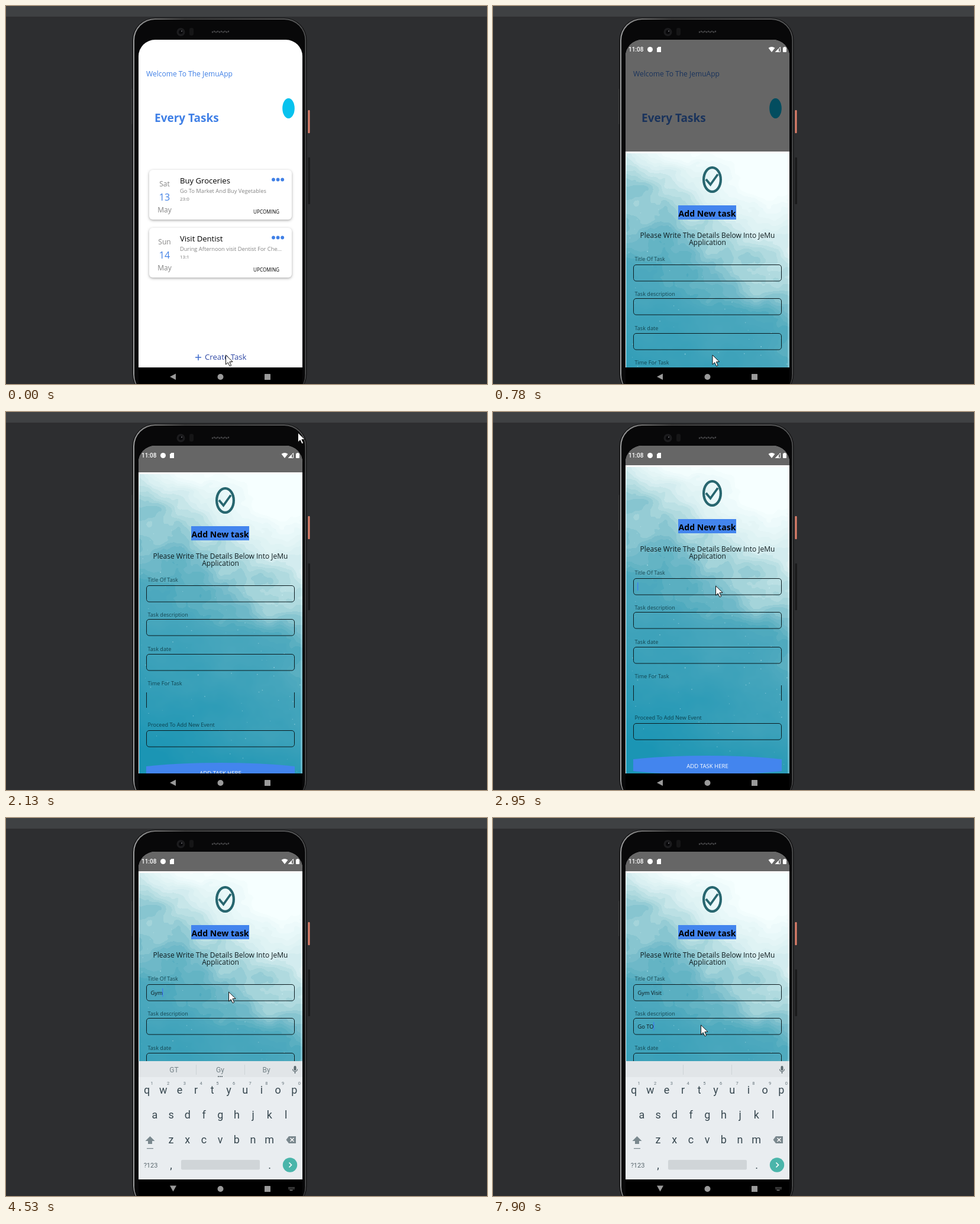
Recreate the animation shown at these times as an HTML page with a canvas. Size 813 by 639 pixels, loop 8 s.

```html
<!DOCTYPE html>
<html lang="en">
<head>
<meta charset="utf-8">
<title>Task form</title>
<style>
html, body { margin: 0; width: 100%; height: 100%; overflow: hidden; background: #2d2e30; }
canvas { display: block; }
</style>
</head>
<body>
<canvas id="stage" width="813" height="639"></canvas>
<script>
const ctx = document.getElementById('stage').getContext('2d');
const LOOP = 8000;
const SANS = '"Open Sans", sans-serif', KEYS = 'Roboto, sans-serif';
const BLUE = '#4080e6', TEAL = '#27666f';
const LEFT = 224, RIGHT = 501, TOP = 57, BOTTOM = 611;

const REFRESH = [0, 500, 620, 780, 920, 1200, 1320, 1460, 1590, 1740, 1870, 1990, 2130, 2280, 2400,
  2520, 2660, 2950, 3080, 3200, 3330, 3460, 3830, 4260, 4410, 4530, 4680, 4800, 4920, 5040, 5160,
  5410, 5530, 5680, 5800, 6350, 6470, 6730, 6850, 7270, 7400, 7510, 7650, 7900];

const POINTER = [[0, 371.5, 590], [780, 371, 590], [920, 355, 396], [1060, 355, 396], [1320, 355, 475],
  [1590, 387, 373], [1870, 435, 190], [2130, 493.5, 35], [2280, 465, 110], [2520, 376, 278],
  [2660, 376.5, 294], [6250, 376.5, 294], [6470, 351.5, 350]];
const SHEET = [[380, BOTTOM], [500, 450], [620, 290], [780, 246], [1590, 246], [1740, 222],
  [1870, 170], [1990, 122], [2130, 102], [2280, 92], [2400, 90]];

const TITLE = [[0, ''], [4260, 'Gy'], [4530, 'Gym'], [4920, 'Gym '], [5160, 'Gym V'], [5410, 'Gym Vi'],
  [5530, 'Gym Vis'], [5680, 'Gym Visi'], [5800, 'Gym Visit']];
const DETAIL = [[0, ''], [7270, 'G'], [7400, 'Go'], [7510, 'Go '], [7650, 'Go T'], [7900, 'Go TO']];
const HINTS = [[0, []], [4410, ['GT', 'Gy', 'By']], [4680, ['Gum', 'Gym', 'Gyms']], [4920, []],
  [5680, ['Visited', 'Visit', 'Visitors']], [6850, []], [7650, ['Good', 'Go', 'Going']], [7900, []]];
const CARET = [[0, 0], [2950, 1], [3830, 0], [4260, 1], [6350, 0], [6730, 2]];

const clamp = v => Math.max(0, Math.min(1, v));
const held = (list, t) => list.findLast(k => k[0] <= t)[1];

function along(keys, t) {
  const i = keys.findIndex(k => k[0] > t);
  if (i < 0) return keys.at(-1).slice(1);
  if (i === 0) return keys[0].slice(1);
  const a = keys[i - 1], b = keys[i], p = (t - a[0]) / (b[0] - a[0]);
  return a.slice(1).map((v, j) => v + (b[j + 1] - v) * p);
}

function rect(x, y, w, h, fill, r = 0) {
  ctx.fillStyle = fill;
  ctx.beginPath();
  ctx.roundRect(x, y, w, h, r);
  ctx.fill();
}

function oval(x, y, rx, ry, fill) {
  ctx.fillStyle = fill;
  ctx.beginPath();
  ctx.ellipse(x, y, rx, ry, 0, 0, 7);
  ctx.fill();
}

function poly(points, fill) {
  ctx.fillStyle = fill;
  ctx.beginPath();
  points.forEach(p => ctx.lineTo(...p));
  ctx.closePath();
  ctx.fill();
}

function line(points, color, width = 1) {
  ctx.strokeStyle = color;
  ctx.lineWidth = width;
  ctx.beginPath();
  points.forEach(p => ctx.lineTo(...p));
  ctx.stroke();
}

function text(s, x, y, size, color, { align = 'left', weight = 400, font = SANS } = {}) {
  ctx.font = `${weight} ${size}px ${font}`;
  ctx.textAlign = align;
  ctx.fillStyle = color;
  ctx.fillText(s, x, y);
}

const hash = (x, y) => {
  const s = Math.sin(x * 127.1 + y * 311.7) * 43758.5453;
  return s - Math.floor(s);
};

function noise(x, y) {
  const ix = Math.floor(x), iy = Math.floor(y);
  const ease = v => v * v * (3 - 2 * v);
  const fx = ease(x - ix), fy = ease(y - iy);
  const mix = (a, b, p) => a + (b - a) * p;
  return mix(mix(hash(ix, iy), hash(ix + 1, iy), fx),
    mix(hash(ix, iy + 1), hash(ix + 1, iy + 1), fx), fy);
}

// Watercolour wash: pale top right, deep teal towards the bottom.
function makeWash() {
  const w = RIGHT - LEFT, h = 540;
  const ramp = [[-150, 246, 255, 255], [-60, 214, 238, 240], [0, 164, 212, 218], [40, 122, 190, 203],
    [100, 78, 169, 190], [250, 52, 158, 184], [400, 27, 149, 180]];
  const wash = new OffscreenCanvas(w, h), c = wash.getContext('2d');
  const image = c.createImageData(w, h);
  for (let y = 0; y < h; y++) for (let x = 0; x < w; x++) {
    let n = 0;
    for (let o = 0; o < 4; o++) n += (noise(x / (70 >> o) + 9 * o, y / (56 >> o) + 5) - .5) / 2 ** o;
    let d = y - 60 - 180 * x / w + n * 75;
    if (d < 120) d = Math.round(d / 14) * 14;
    image.data.set([...along(ramp, d), 255], (y * w + x) * 4);
  }
  c.putImageData(image, 0, 0);
  for (let i = 0; i < 110; i++) {
    c.fillStyle = `rgba(215,245,250,${.15 + .4 * hash(i, 3)})`;
    c.beginPath();
    c.arc(hash(i, 1) * w, 90 + hash(i, 2) * 420, .4 + .6 * hash(i, 4), 0, 7);
    c.fill();
  }
  return wash;
}
const wash = makeWash();

function drawPhone() {
  rect(0, 0, 813, 639, '#2d2e30');
  rect(0, 0, 813, 18, '#3f4143');
  rect(510.5, 176, 3, 39, '#e5826c', 1);
  rect(510.5, 256, 3.5, 79, '#1b1b1c', 1);
  rect(212, 140, 2, 60, '#3a3b3c', 1);
  const edge = ctx.createLinearGradient(214, 0, 508, 0);
  edge.addColorStop(0, '#a0a1a2');
  edge.addColorStop(.12, '#777');
  edge.addColorStop(.3, '#444');
  edge.addColorStop(1, '#595a5b');
  rect(213.5, 20, 295, 640, '#141415', 38);
  rect(215, 21, 292, 638, edge, 37);
  rect(217, 23, 288.5, 636, '#080809', 35);
  oval(295.5, 44, 7, 7, '#1c1c1e');
  oval(295.5, 44, 3.5, 3.5, '#08080a');
  oval(297, 42.5, 1, 1, '#77777c');
  rect(310, 37, 7, 13, '#161617', 3);
  for (let i = 0; i < 10; i++) oval(349 + i * 3, 44 - i % 2, 1.2, 1.5, '#4b4b4d');
}

function drawCard(y, day, date, title, detail, time) {
  ctx.save();
  ctx.shadowColor = 'rgba(0,0,0,.34)';
  ctx.shadowBlur = 4;
  ctx.shadowOffsetY = 1.5;
  rect(242, y, 241, 84, '#fff', 6);
  ctx.restore();
  const mid = { align: 'center' };
  text(day, 268, y + 28, 12, '#858585', mid);
  text(date, 268, y + 52, 16, BLUE, mid);
  text('May', 268, y + 72, 12, '#858585', mid);
  text(title, 294, y + 23, 13.1, '#000');
  text(detail, 294, y + 39, 9.3, '#858585');
  text(time, 294, y + 52, 8, '#777');
  text('UPCOMING', 418, y + 74, 8.2, '#000');
  for (let i = 0; i < 3; i++) oval(452 + i * 7.6, y + 16.5, 2.9, 2.9, BLUE);
}

function drawHome() {
  rect(LEFT, TOP, 277, 554, '#fff');
  text('Welcome To The JemuApp', 237, 119, 12.05, BLUE);
  text('Every Tasks', 251, 196, 19, BLUE, { weight: 700 });
  oval(477.5, 173, 10.3, 17, '#08c2ee');
  drawCard(277, 'Sat', '13', 'Buy Groceries', 'Go To Market And Buy Vegetables', '23:0');
  drawCard(375, 'Sun', '14', 'Visit Dentist', 'During Afternoon visit Dentist For Che...', '13:1');
  line([[320, 594], [330, 594]], '#3b68cc', 1.5);
  line([[325, 589], [325, 599]], '#3b68cc', 1.5);
  text('Create Task', 336, 598, 13.2, '#2f48a4');
}

function drawStatus() {
  text('11:08', 229, 77, 10, '#fff', { weight: 500, font: KEYS });
  oval(265.5, 73.5, 4.5, 4.5, '#fff');
  poly([[279.5, 69], [284, 69], [284, 78], [277, 78], [277, 71.5]], '#fff');
  ctx.fillStyle = '#fff';
  ctx.beginPath();
  ctx.moveTo(471, 78);
  ctx.lineTo(465.5, 71);
  ctx.quadraticCurveTo(471, 67, 476.5, 71);
  ctx.fill();
  line([[477.5, 77.5], [485.5, 77.5], [485.5, 69.5], [477.5, 77.5]], '#fff');
  poly([[477, 78], [483, 78], [483, 72]], '#fff');
  rect(490, 70, 6, 8, '#fff', 1);
  rect(491.5, 69, 3, 2, '#fff');
}

function drawEntry(s, y, caret) {
  text(s, 244.5, y + 18, 9.3, '#0c1518');
  if (caret) rect(244 + ctx.measureText(s).width, y + 7, 1.3, 14, '#3f7df0');
}

function drawSheet(y, t) {
  const mid = { align: 'center' };
  rect(LEFT, y, 277, BOTTOM - y, '#fff');
  ctx.drawImage(wash, LEFT + 1, y + 3);
  rect(498, y + 3, 3, BOTTOM - y, 'rgba(255,255,255,.25)');

  ctx.strokeStyle = TEAL;
  ctx.lineWidth = 4.2;
  ctx.beginPath();
  ctx.ellipse(370.5, y + 47.5, 14.4, 20.4, 0, 0, 7);
  ctx.stroke();
  line([[360, y + 47], [367.5, y + 56], [380, y + 38.5]], TEAL, 3.8);

  rect(313, y + 91, 98, 24, '#4385ee');
  text('Add New task', 362, y + 110, 14.1, '#000', { align: 'center', weight: 700 });
  text('Please Write The Details Below Into JeMu', 362.5, y + 146, 12, '#101c1f', mid);
  text('Application', 362.5, y + 158, 12, '#101c1f', mid);

  const labels = [['Title Of Task', 184.5, 191], ['Task description', 244, 248], ['Task date', 301.5, 307],
    ['Time For Task', 360, 371], ['Proceed To Add New Event', 430, 436]];
  labels.forEach(([label, base, top], i) => {
    text(label, 239.5, y + base, 9.1, 'rgba(0,30,38,.72)');
    ctx.strokeStyle = '#0b1a1e';
    ctx.lineWidth = 1;
    if (i === 3) {
      for (const x of [237.5, 487.5]) line([[x, y + top + 1], [x, y + top + 27]], '#0b1a1e');
    } else {
      ctx.beginPath();
      ctx.roundRect(237.5, y + top + .5, 250, 27.5, 4.5);
      ctx.stroke();
    }
  });
  const caret = held(CARET, t);
  drawEntry(held(TITLE, t), y + 191, caret === 1);
  drawEntry(held(DETAIL, t), y + 248, caret === 2);

  ctx.save();
  ctx.beginPath();
  ctx.rect(237, y + 490, 251, 31);
  ctx.clip();
  oval(362.5, y + 507, 160, 16, '#4385ee');
  ctx.restore();
  text('ADD TASK HERE', 362.5, y + 511.5, 9.6, '#fff', mid);
}

function drawKeyboard(y, hints) {
  const key = { align: 'center', font: KEYS }, ink = '#37474f', soft = '#7a888e';
  rect(LEFT, y, 277, 200, '#e9edf0');
  rect(LEFT, y, 277, 27, '#e1e5e8');
  for (const x of [321, 403]) rect(x, y + 6, 1, 17, '#ced4d7');
  hints.forEach((word, i) => {
    const bold = i === 1 && word === 'Visit';
    text(word, 284 + i * 78, y + 19, 12, bold ? '#4d5b61' : '#738086', { ...key, weight: bold ? 700 : 400 });
  });
  if (hints.length) for (let i = -1; i < 2; i++) oval(362 + i * 3, y + 26, 1, 1, '#465359');

  rect(486.5, y + 8, 4, 8, '#59676d', 2);
  ctx.strokeStyle = '#59676d';
  ctx.lineWidth = 1.2;
  ctx.beginPath();
  ctx.arc(488.5, y + 13.5, 4, 0, Math.PI);
  ctx.stroke();
  line([[488.5, y + 17], [488.5, y + 21]], '#59676d', 1.4);

  [['qwertyuiop', 238, 55], ['asdfghjkl', 251.5, 97], ['zxcvbnm', 279, 139]].forEach(([row, x, base], r) => {
    [...row].forEach((letter, i) => {
      text(letter, x + i * 27.7, y + base, 18, ink, key);
      if (!r) text((i + 1) % 10, x + 8.5 + i * 27.7, y + 40, 7.5, '#66757c', key);
    });
  });
  poly([[243.5, y + 127], [251.5, y + 135], [247, y + 135], [247, y + 140], [240, y + 140],
    [240, y + 135], [235.5, y + 135]], soft);
  rect(238, y + 147, 11, 1.3, soft);
  poly([[473.5, y + 133], [478, y + 127], [490, y + 127], [490, y + 139], [478, y + 139]], soft);
  line([[480.5, y + 130], [486.5, y + 136]], '#fff', 1.4);
  line([[486.5, y + 130], [480.5, y + 136]], '#fff', 1.4);

  text('?123', 244.5, y + 179.5, 11, '#59676d', key);
  text(',', 279, y + 182, 18, ink, key);
  text('.', 445.5, y + 182, 18, ink, key);
  rect(296, y + 167, 133, 16.5, '#d0d5d8', 2);
  oval(480, y + 175.5, 12.2, 12.2, '#4ab5aa');
  line([[478.5, y + 171.5], [482.5, y + 175.5], [478.5, y + 179.5]], '#fff', 1.6);
}

function drawNav(keyboard, open) {
  const grey = '#9a9a9a';
  poly(open ? [[277, 621.5], [288, 621.5], [282.5, 631.5]] : [[287, 621.5], [287, 632], [277, 626.7]], grey);
  oval(362.5, 627, 5, 5, grey);
  rect(437, 622, 10, 10, grey, .5);
  if (!keyboard) return;
  for (let i = 0; i < 5; i++) for (let j = 0; j < 2; j++) rect(477.5 + i * 2.2, 624 + j * 2.2, 1.2, 1.2, grey);
  rect(479.5, 628.6, 5, 1.2, grey);
}

function drawPointer(x, y) {
  const shape = [[0, 0], [0, 16], [3.7, 12.6], [6.6, 18.8], [9.2, 17.6], [6.4, 11.6], [11.6, 11.4]]
    .map(([dx, dy]) => [x + dx, y + dy]);
  poly(shape, '#fff');
  line([...shape, shape[0]], '#111', 1);
}

function draw(now) {
  const t = REFRESH.findLast(r => r <= now);
  const [sheetTop] = along(SHEET, t);
  const rise = clamp((t - 2950) / 400);

  drawPhone();
  ctx.save();
  ctx.beginPath();
  ctx.roundRect(LEFT, TOP, 277, 700, [28, 28, 0, 0]);
  ctx.clip();
  drawHome();
  rect(LEFT, TOP, 277, 554, `rgba(0,0,0,${.6 * clamp((t - 380) / 400)})`);
  if (sheetTop < BOTTOM) drawSheet(sheetTop, t);
  drawStatus();
  rect(LEFT, BOTTOM, 277, 100, '#000');
  if (rise > 0) {
    ctx.globalAlpha = clamp(rise * 2);
    drawKeyboard(411 + 200 * (1 - rise) ** 4, held(HINTS, t));
    ctx.globalAlpha = 1;
  }
  ctx.restore();
  drawNav(rise > 0, t >= 3330);
  drawPointer(...along(POINTER, t));
}

function loop(now) {
  draw(now % LOOP);
  requestAnimationFrame(loop);
}
requestAnimationFrame(loop);
</script>
</body>
</html>
```
